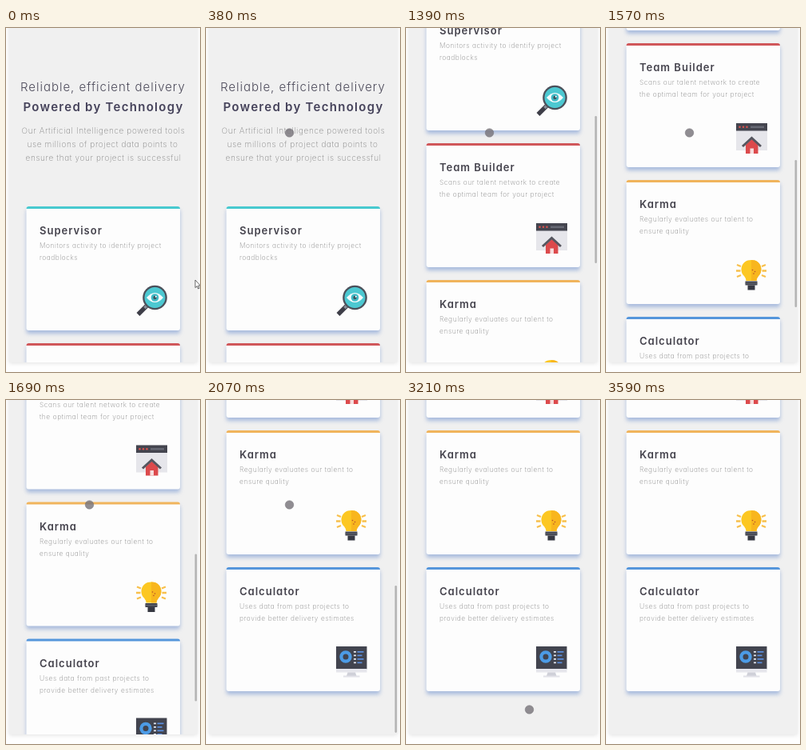
Animation of 243x430 px, one loop 3.69 s. Source, as an HTML page:

```html
<!DOCTYPE html>
<html lang="en">
<head>
<meta charset="utf-8">
<title>Scrolling cards</title>
<style>
html, body { margin: 0; width: 100%; height: 100%; overflow: hidden; background: #fefefe; }
svg { display: block; width: 243px; height: 430px; font-family: Inter, "Open Sans", sans-serif; font-feature-settings: "cv11"; }
.phone { fill: #f0f0f0; filter: drop-shadow(0 1px 2.5px rgba(60, 60, 60, .14)); }
.lead { font-size: 15px; font-weight: 300; letter-spacing: .98px; fill: #4c4a5a; }
.strong { font-size: 15px; font-weight: 600; letter-spacing: 1.28px; fill: #45425a; }
.intro { font-size: 10px; font-weight: 200; letter-spacing: .64px; fill: #858585; }
.panel { fill: #fdfdfd; filter: drop-shadow(0 4px 2.5px rgba(125, 155, 210, .62)); }
.title { font-size: 13px; font-weight: 600; letter-spacing: 1px; fill: #45434d; }
.note { font-size: 8.4px; font-weight: 200; letter-spacing: .58px; fill: #858585; }
</style>
</head>
<body>
<svg viewBox="0 0 243 430">
  <clipPath id="screen"><rect x="4" width="236" height="418"/></clipPath>
  <rect class="phone" x="4" y="-6" width="235.5" height="424"/>
  <g clip-path="url(#screen)">
    <g id="page">
      <text class="lead" x="18" y="78.5">Reliable, efficient delivery</text>
      <text class="strong" x="21.5" y="103.5">Powered by Technology</text>
      <text class="intro" x="19.5" y="132">Our Artificial Intelligence powered tools</text>
      <text class="intro" x="26.5" y="149">use millions of project data points to</text>
      <text class="intro" x="24.5" y="166">ensure that your project is successful</text>
    </g>
    <rect id="bar" x="236.5" width="2.6" height="184" rx="1.3" fill="#b4b4b4"/>
    <circle id="touch" r="5.3" fill="#77747a" fill-opacity=".82" stroke="#6c6a70" stroke-opacity=".6" stroke-width=".7"/>
  </g>
  <path id="arrow" d="M237 315v9.6l2.2-2 1.5 3.4 1.5-.7-1.5-3.2h2.8z" fill="#fff" stroke="#444" stroke-width=".8"/>
</svg>
<script>
const LOOP = 3690, TICK = 62.5, MAX_SCROLL = 527, CARD_STEP = 171;
const STEPS = [0, 90, 190, 290, 380, 1180, 1270, 1370, 1470, 1570, 1690, 1990, 2070, 2490,
  2590, 2690, 2790, 2900, 2980, 3090, 3190, 3290, 3390, 3590];
const WHEEL = [1180, 1270, 1370, 1370, 1470, 1570, 1690, 1990, 2070];

const rect = (x, y, w, h, fill) => `<rect x="${x}" y="${y}" width="${w}" height="${h}" fill="${fill}"/>`;
const disc = (x, y, r, fill) => `<circle cx="${x}" cy="${y}" r="${r}" fill="${fill}"/>`;
const shape = (d, fill) => `<path d="${d}" fill="${fill}"/>`;
const line = (d, stroke, width) => `<path d="${d}" fill="none" stroke="${stroke}" stroke-width="${width}"/>`;

const magnifier = line('M13 25.5L2.5 36', '#3e3e48', 5.5) + line('M14 24.5L10.5 28', '#8a8f98', 3.5)
  + disc(23.5, 15, 15.3, '#4b505a') + disc(23.5, 15, 13, '#4cc8d1')
  + shape('M13 15Q23.5 3 34 15Q23.5 27 13 15z', '#f4fbfc')
  + disc(23.5, 15, 4.8, '#3fbac6') + disc(23.5, 15, 2.2, '#3d5660') + disc(24.8, 13.8, 1, '#fff');

const browser = rect(0, 1, 39, 34, '#e6e6eb') + rect(0, 1, 39, 9.5, '#44454f')
  + [4.5, 9, 13.5].map(x => disc(x, 5.8, 1.3, '#d9534f')).join('') + rect(18, 4.6, 17, 2.4, '#686a75')
  + shape('M12 28L19.5 21L27.5 28V39H12z', '#dc4a4c') + rect(17.5, 32.5, 4.5, 6.5, '#f6dede')
  + line('M8 30L19.5 19.5L31 30', '#55565f', 3);

const bulb = line('M1 7l5 2M0 14.5h5.5M1 22l5-2M37 7l-5 2M38 14.5h-5.5M37 22l-5-2', '#f8c04c', 2.3)
  + shape('M19 1C6 1 3.5 15 10 21Q12.5 24 12.5 27H25.5Q25.5 24 28 21C34.5 15 32 1 19 1z', '#fcc722')
  + shape('M19 1C32 1 34.5 15 28 21Q25.5 24 25.5 27H19z', '#f8b61e')
  + disc(20.5, 13.5, .8, '#b5502a') + disc(23.5, 15.5, .8, '#b5502a') + disc(22, 18, .8, '#b5502a')
  + rect(11.5, 27.5, 15, 5, '#43454f') + rect(14.5, 32.5, 9, 6, '#363842') + rect(11.5, 29.5, 15, 1, '#656873');

const monitor = rect(0, 0, 38.5, 28.5, '#42444f') + rect(0, 28, 38.5, 4.5, '#e6e6ec')
  + shape('M14.5 32.5H24L25.5 37H13z', '#cfd0d8') + rect(9, 36.5, 20.5, 2, '#e2e2e8')
  + '<circle cx="12" cy="13" r="5.6" fill="none" stroke="#4c9be6" stroke-width="4.2"/>'
  + [6, 10.5, 15, 19.5].map((y, i) => rect(22, y, 3, 1.7, '#e3e7f0') + rect(26.5, y, i % 2 ? 6 : 8, 1.7, '#5b8fe0')).join('');

const cards = [
  ['#47c9cf', 'Supervisor', 'Monitors activity to identify project', 'roadblocks', magnifier],
  ['#d0575a', 'Team Builder', 'Scans our talent network to create', 'the optimal team for your project', browser],
  ['#f0b45c', 'Karma', 'Regularly evaluates our talent to', 'ensure quality', bulb],
  ['#5596db', 'Calculator', 'Uses data from past projects to', 'provide better delivery estimates', monitor]
];

const $ = id => document.getElementById(id);
const page = $('page'), bar = $('bar'), touch = $('touch'), arrow = $('arrow');

page.innerHTML += cards.map(([color, title, first, second, icon], i) => `
  <g transform="translate(25.5 ${223 + i * CARD_STEP})">
    <rect class="panel" width="192.5" height="155" rx="3"/>
    <path d="M0 3V3Q0 0 3 0H189.5Q192.5 0 192.5 3V3z" fill="${color}"/>
    <text class="title" x="16.5" y="35">${title}</text>
    <text class="note" x="16.5" y="52">${first}</text>
    <text class="note" x="16.5" y="67">${second}</text>
    <g transform="translate(137.5 99)">${icon}</g>
  </g>`).join('');

function pointer(t) {
  if (t < 2490) {
    const left = Math.max(0, 1 - t / 380) ** 3;
    return [104.5 + 134 * left, 131 + 187 * left];
  }
  const p = (t - 2390) / 400;
  return [104.5 + 12.5 * p ** 2, 131 + 32 * p ** 3];
}

function draw(time) {
  const t = STEPS.findLast(step => step <= time % LOOP);
  const scroll = Math.min(MAX_SCROLL, TICK * WHEEL.filter(w => w <= t).length);
  const [x, y] = pointer(t);
  page.setAttribute('transform', `translate(0 ${-scroll})`);
  bar.setAttribute('y', scroll * .44);
  bar.setAttribute('opacity', t < 1180 ? 0 : Math.min(1, Math.max(0, (2690 - t) / 300)));
  touch.setAttribute('transform', `translate(${x} ${y})`);
  touch.setAttribute('visibility', t < 90 ? 'hidden' : 'visible');
  arrow.setAttribute('visibility', t < 90 ? 'visible' : 'hidden');
}

const start = performance.now();
function tick() {
  draw(performance.now() - start);
  requestAnimationFrame(tick);
}
tick();
</script>
</body>
</html>
```
